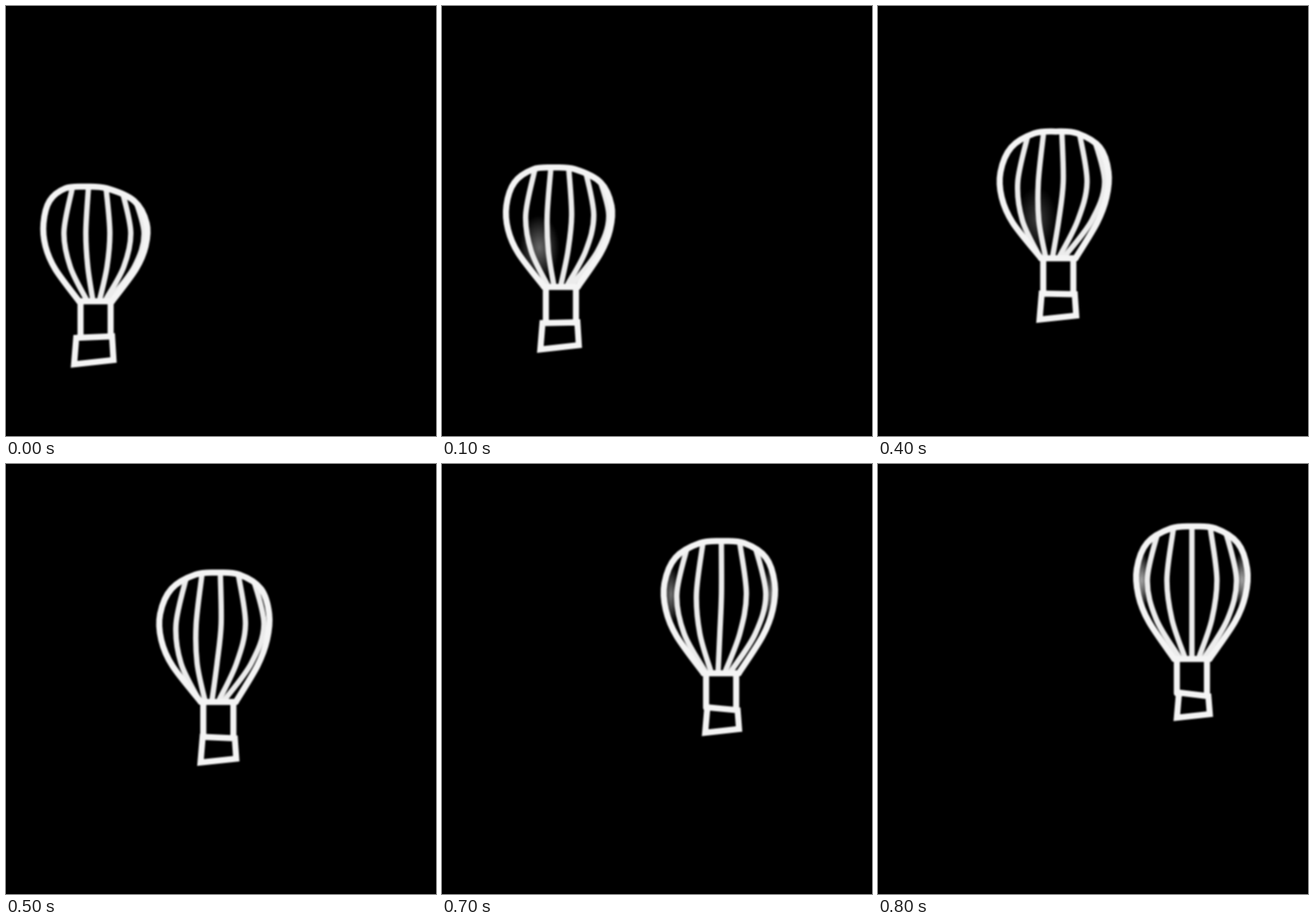
Write an HTML page with a canvas that moves like this. It is 600 by 600 pixels and loops after 1 s.

```html
<!DOCTYPE html>
<html>
<head>
<meta charset="utf-8">
<style>
html, body { margin: 0; height: 100%; overflow: hidden; background: #000; }
canvas { display: block; width: 600px; height: 600px; filter: blur(1.1px); }
</style>
</head>
<body>
<canvas width="600" height="600"></canvas>
<script>
const ctx = document.querySelector('canvas').getContext('2d');

// Right half of the envelope, neck to top, in units of its half width and height.
const half = [[.32, 0], [.78, .28], [.97, .48], [1, .68], [.82, .875], [.4, .985]];
const profile = [...half.map(([x, y]) => [-x, y]), [0, 1], ...half.reverse()];

// Smooth open curve through the points.
function curve(points) {
  const path = new Path2D();
  path.moveTo(...points[0]);
  for (let i = 1; i < points.length; i++) {
    const a = points[i - 1], b = points[i];
    const before = points[i - 2] || a, after = points[i + 1] || b;
    path.bezierCurveTo(
      a[0] + (b[0] - before[0]) / 6, a[1] + (b[1] - before[1]) / 6,
      b[0] - (after[0] - a[0]) / 6, b[1] - (after[1] - a[1]) / 6, ...b);
  }
  return path;
}

function line(...points) {
  ctx.beginPath();
  points.forEach(p => ctx.lineTo(...p));
  ctx.stroke();
}

function smear(x, y, rx, ry, alpha) {
  ctx.save();
  ctx.translate(x, y);
  ctx.scale(rx, ry);
  const glow = ctx.createRadialGradient(0, 0, 0, 0, 0, 1);
  glow.addColorStop(0, `rgba(240,240,240,${Math.max(0, alpha)})`);
  glow.addColorStop(1, 'rgba(240,240,240,0)');
  ctx.fillStyle = glow;
  ctx.fillRect(-1, -1, 2, 2);
  ctx.restore();
}

// u runs from 0 to 1 along the flight; the origin is the middle of the neck.
function draw(u) {
  const ease = 1 - (1 - u) ** 2;
  const width = 72 + 5 * ease, height = 160 + 25 * ease;
  const lean = -10 * Math.sin(Math.PI * u);
  const topShift = -15 + 17 * ease;
  const turn = .28 * (1 - ease);

  ctx.fillStyle = '#000';
  ctx.fillRect(0, 0, 600, 600);
  ctx.save();
  ctx.translate(125 + 282 * u + 31 * u * u, 412 - 140 * u);
  ctx.lineJoin = ctx.lineCap = 'round';

  const outline = profile.map(([x, y]) =>
    [x * width + topShift * y ** 8 + lean * 2.4 * y * (1 - y), -y * height]);
  const envelope = curve(outline);

  ctx.save();
  ctx.clip(envelope);
  smear(-30, -55, 28, 45, .55 * Math.sin(2 * Math.PI * u));
  for (const side of [-1, 1]) smear(side * 70, -110, 12, 40, 1.6 * u - .9);
  ctx.strokeStyle = '#ececec';
  ctx.lineWidth = 7.5;
  for (let k = -2; k <= 2; k++) {
    const x = width * Math.sin(turn + .47 * k);
    ctx.stroke(curve([
      [x * .75, -.97 * height], [x, -.6 * height],
      [x * .8 + lean / 2, -.3 * height], [x * .3 + lean, -.02 * height]]));
  }
  ctx.restore();

  ctx.strokeStyle = '#f4f4f4';
  ctx.lineWidth = 8.5;
  ctx.stroke(envelope);
  line(outline[0], outline[outline.length - 1]);
  for (const side of [-21, 21]) line([side, 2], [side, 48]);
  const left = -27 + 9 * u, right = 23;
  const topLeft = [left, 51 - 4 * u], topRight = [right, 49 + 3 * u];
  ctx.lineJoin = 'miter';
  line(topLeft, topRight, [right + 2, 82 - 5 * u], [left - 3, 88 - 6 * u], topLeft, topRight);
  ctx.restore();
}

// Seven steps of 100 ms; the second pose and the last one hold twice as long.
function frame() {
  const tick = Math.floor(performance.now() % 1000 / 100);
  draw(Math.min(7, tick > 1 ? tick - 1 : tick) / 7);
  requestAnimationFrame(frame);
}
frame();
</script>
</body>
</html>
```
